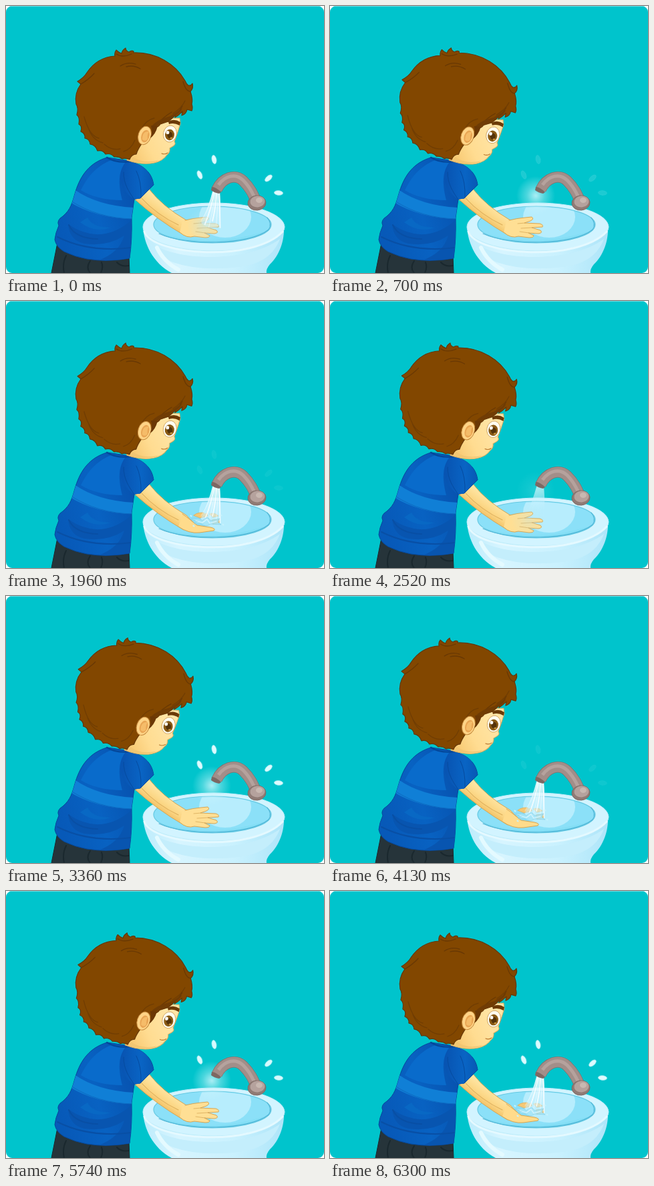
Animation, 476 px wide and 400 px high, one loop 6.37 s. Source, as an HTML page with a canvas:

```html
<!DOCTYPE html>
<html lang="en">
<head>
<meta charset="utf-8">
<title>Washing hands</title>
<style>
html, body { margin: 0; width: 100%; height: 100%; overflow: hidden; background: #fff; }
canvas { display: block; width: 476px; height: 400px; }
</style>
</head>
<body>
<canvas id="stage" width="476" height="400"></canvas>
<script>
const ctx = document.getElementById('stage').getContext('2d');
const LOOP = 6370, STEP = 70, CYCLE = LOOP / 3;

function shape(d, fill, stroke, width = 1) {
  const path = new Path2D(d);
  if (fill) { ctx.fillStyle = fill; ctx.fill(path); }
  if (stroke) { ctx.strokeStyle = stroke; ctx.lineWidth = width; ctx.stroke(path); }
}

function oval(x, y, rx, ry, turn, fill, stroke, width = 1) {
  ctx.beginPath();
  ctx.ellipse(x, y, rx, ry, turn, 0, Math.PI * 2);
  if (fill) { ctx.fillStyle = fill; ctx.fill(); }
  if (stroke) { ctx.strokeStyle = stroke; ctx.lineWidth = width; ctx.stroke(); }
}

function blend(x0, y0, x1, y1, ...stops) {
  const g = ctx.createLinearGradient(x0, y0, x1, y1);
  stops.forEach(([at, color]) => g.addColorStop(at, color));
  return g;
}

function glow(x, y, radius, rgb, alpha) {
  const g = ctx.createRadialGradient(x, y, 1, x, y, radius);
  g.addColorStop(0, `rgba(${rgb},${alpha})`);
  g.addColorStop(.45, `rgba(${rgb},${alpha * .45})`);
  g.addColorStop(1, `rgba(${rgb},0)`);
  ctx.fillStyle = g;
  ctx.fillRect(x - radius, y - radius, radius * 2, radius * 2);
}

function layer(alpha, draw) {
  if (alpha <= 0) return;
  ctx.save();
  ctx.globalAlpha = alpha;
  draw();
  ctx.restore();
}

// Linear interpolation through [time, value] pairs.
function track(u, keys) {
  const i = Math.max(1, keys.findIndex(k => k[0] >= u));
  const [a, va] = keys[i - 1], [b, vb] = keys[i];
  return va + (vb - va) * (u - a) / (b - a);
}

const WATER = [[0, 1], [.1, 1], [.3, 0], [.75, 0], [.88, 1], [1, 1]];
const DROPS = [[0, 1], [.06, 1], [.16, 0], [.3, 0], [.41, .5], [.5, 1],
  [.7, 1], [.82, 0], [.945, .06], [.96, 1], [1, 1]];

function background() {
  ctx.fillStyle = '#fff';
  ctx.fillRect(0, 0, 476, 400);
  ctx.beginPath();
  ctx.roundRect(0, 0, 476, 400, 9);
  ctx.fillStyle = '#00c4cc';
  ctx.fill();
  ctx.fillStyle = 'rgba(255,255,255,.4)';
  ctx.fillRect(8, 0, 460, 1);
}

function sink() {
  shape('M205 330C206 356 220 385 248 400H390Q389 394 395 387C409 374 417 352 416 331Z',
    blend(205, 0, 416, 0, [0, '#bdecfc'], [.25, '#d7f5ff'], [.65, '#c9f1fe'], [1, '#aee5f9']));
  shape('M214 352C248 383 360 386 410 349C401 372 384 386 350 391Q290 398 250 384Q226 374 214 352Z', '#c4eefc');
  shape('M226 362Q236 383 258 395', null, '#e4faff', 6);
  oval(311, 331, 106, 36, 0, '#d2f4ff', '#bcecfa');
  shape('M207 338C220 374 371 384 414 338', null, '#e4f9ff', 3);
  oval(309, 327.5, 88, 27.5, 0, '#8be0f8', '#65c9e2', 1.2);
  ctx.save();
  ctx.beginPath();
  ctx.ellipse(309, 327.5, 87, 26.5, 0, 0, 7);
  ctx.clip();
  oval(328, 316, 39, 31, 0, '#b7edfd');
  shape('M227 339Q306 364 390 337L375 358H240Z', '#83def5');
  ctx.restore();
  shape('M229 341C268 359 364 359 393 335Q399 327 391 317', null, '#4fb5d6', 1.1);
}

function tap() {
  ctx.lineCap = 'butt';
  const pipe = 'M315.5 275C324 257 343 250.5 355 262C366 273 370 282 374 292';
  shape(pipe, null, '#86706b', 16.5);
  shape(pipe, null, '#a28e89', 15);
  shape('M318 268C328 254 344 250 355 261C365 271 369 280 372 287', null, '#b5a29d', 5);
  shape('M308 271Q314 271 322 279L319 281Q312 280 307 276Z', '#7d6863');
  oval(375.5, 295, 13.5, 11, -.1, '#907b75', '#806a65');
  oval(376.5, 293, 11, 8.5, -.1, '#b5a29d');
  oval(379, 291, 5, 4, 0, '#c8b8b1');
}

function body() {
  shape('M78 350L68 400H185L184 374Z', '#26343a', '#1b2a30');
  shape('M90 374Q84 386 87 400M143 384Q146 391 142 400M126 382Q119 392 126 400M166 384Q172 391 184 389', null, '#1a282e', 2);
  const shirt = 'M151 227C125 235 112 253 104 278C99 295 97 305 85 315Q75 321 79 329Q74 340 73 350' +
    'Q75 361 87 368Q104 376 121 379Q152 384 185 378Q189 349 188 317L192 289L201 288L221 268C218 245 199 235 178 231Z';
  shape(shirt, blend(80, 330, 195, 300, [0, '#0759b8'], [.5, '#0862c2'], [1, '#0753b0']), '#06489a', 1);
  ctx.save();
  ctx.clip(new Path2D(shirt));
  shape('M157 231C132 242 122 257 112 276Q137 291 174 291C167 263 169 245 180 233Z', '#096bcb');
  shape('M104 276Q137 299 191 302L190 319Q135 318 94 293Z', '#107fd6');
  shape('M97 292Q137 318 190 319', null, '#0c69c0', 1);
  shape('M93 327Q142 360 188 321V383H133Q170 371 177 344Q151 361 117 356Q95 351 93 327Z', '#0855b0');
  shape('M77 346Q125 370 187 362M94 328Q103 348 137 349', null, '#084fa5', 2);
  shape('M122 317Q130 332 156 332Q133 341 111 324Z', '#0868c4');
  ctx.restore();
  shape('M181 233C164 252 171 276 192 290L201 288L221 268C216 245 201 235 181 233Z',
    blend(174, 0, 221, 0, [0, '#0854b2'], [.6, '#0964c4'], [1, '#0758b4']));
  shape('M176 249C176 267 184 278 192 290M201 288L221 268M195 247Q203 263 202 287', null, '#064b9f', 1);
  shape('M151 227Q165 236 188 233', null, '#04479a', 2.2);
}

function arm(splashing) {
  const edge = '#d6a552';
  shape('M192 289L214 274Q234 300 270 321L281 333L266 343Q226 320 192 289Z',
    blend(228, 322, 244, 300, [0, '#f0bd60'], [.45, '#fbd684'], [1, '#ffe5a3']), edge);
  shape('M203 288Q226 313 258 328', null, '#dcad5b', 1.1);
  if (splashing) {
    shape('M264 320Q278 330 286 336L306 339Q315 341 311 344L290 347Q274 349 258 338Z', '#ffdb8b');
    shape('M264 319Q278 329 286 336L306 339Q315 341 311 344L290 347Q274 349 258 338', null, edge);
    shape('M281 321Q288 315 301 318L302 322L291 325ZM305 319Q312 316 318 322L310 324ZM309 328L319 327L320 332L310 334Z',
      '#f5c874', '#e0ae5a', .8);
  } else {
    shape('M264 323Q280 318 292 317L302 316Q306 319 300 322L291 325L314 326Q320 328 318 331' +
      'L302 332L315 336Q319 340 312 341L297 340L305 344Q305 347 298 347L282 345Q271 349 260 339Z', '#ffdf94');
    shape('M268 321Q280 318 292 317L302 316Q306 319 300 322L291 325L314 326Q320 328 318 331' +
      'L302 332L315 336Q319 340 312 341L297 340L305 344Q305 347 298 347L282 345Q271 349 260 339', null, edge);
    shape('M281 326L292 325M286 333L302 332M284 338L298 340', null, '#dcb060', .9);
  }
}

function mist(alpha) {
  layer(alpha, () => glow(308, 284, 29, '205,246,252', .8));
}

// A soft beam that sharpens into separate jets as the level rises.
function stream(level) {
  const end = 286 + 48 * level;
  layer(Math.min(1, level * 1.4), () => {
    ctx.beginPath();
    ctx.rect(275, 270, 65, end - 270);
    ctx.clip();
    const foot = level > .95 ? .4 : 0;
    shape('M310 275Q302 304 292 325Q306 338 321 329Q322 299 320 278Z',
      blend(0, 274, 0, end, [0, 'rgba(240,253,255,.9)'], [.6, 'rgba(205,243,255,.68)'], [1, `rgba(197,241,255,${foot})`]));
  });
  layer(level * 2 - 1.1, () => {
    for (let i = 0; i < 6; i++) {
      shape(`M${310 + i * 1.8} 277Q${305 + i * 3} 302 ${292 + i * 5.7} ${322 + i % 3 * 5}`, null,
        `rgba(255,255,255,${.55 + .3 * (i % 2)})`, i % 2 ? 1.8 : 1);
    }
  });
}

function splash() {
  shape('M276 327Q288 323 294 329Q302 320 306 329L320 326Q314 331 322 335L306 334Q299 340 292 334L281 333L287 330Z',
    'rgba(165,229,248,.8)', 'rgba(120,195,220,.6)', .8);
  shape('M284 329L294 332L301 327L305 333L315 330', null, 'rgba(234,250,255,.8)', 1.2);
  [[277, 322], [298, 317], [322, 321], [325, 335], [281, 337]].forEach(([x, y]) =>
    oval(x, y, 1.7, 1.2, .5, '#c7f2fc'));
}

function drops(alpha) {
  layer(alpha, () => {
    [[290, 253, -.4], [311.5, 230, -.2], [393, 258, .85], [408, 280, 1.65]].forEach(([x, y, turn]) =>
      oval(x, y, 3.4, 6.6, turn, '#dcfbff', '#9ce9ee', .8));
  });
}

function head(lean) {
  ctx.save();
  ctx.translate(185, 140);
  ctx.rotate(.045 * lean);
  ctx.translate(-185, -140);

  shape('M190 168H260L261 176Q257 190 252 203Q255 207 250 210L245 213Q246 219 241 223' +
    'Q235 232 222 235Q204 239 181 231Z', blend(188, 222, 250, 190, [0, '#f8ca74'], [.4, '#ffdc91'], [1, '#ffe5a6']), '#dbb062');
  shape('M190 226Q205 237 229 231Q218 238 185 232Z', '#f2c672');
  shape('M233 221Q238 223 242 220', null, '#b9782f', 1.1);

  oval(245.5, 191.5, 10, 12.5, .2, '#fffdf0', '#cfa05a', .9);
  oval(245, 193, 7, 8.3, .1, '#8a5a14');
  oval(245.5, 193.5, 4, 4.8, 0, '#54330a');
  oval(242, 189.5, 2.4, 2.6, 0, '#fff');
  oval(247.5, 198, 2, 1.4, 0, '#c6923f');
  shape('M243 173Q252 168 261 174L260 179Q251 174 244 177Z', '#6b3a06');

  shape('M163 75Q162 70 165 66Q169 70 173 71Q174 66 179 63Q179 67 184 69Q188 66 191 68L191 70' +
    'C225 69 254 87 268 112Q270 117 273 119Q277 120 279 116Q281 123 276 128Q280 140 278 147' +
    'Q280 153 278 157L271 155Q270 162 263 164L264 158Q258 164 253 167L254 162Q249 169 243 173' +
    'L231 177Q228 182 222 182Q217 196 204 205Q197 215 195 222Q188 222 185 230Q178 227 174 229' +
    'Q169 225 162 226Q157 220 149 222Q145 215 137 217Q134 208 126 207Q125 199 118 198' +
    'Q119 191 112 188Q115 180 109 177Q111 167 106 163Q109 153 105 147Q102 131 112 117' +
    'L107 113Q117 107 121 100Q136 77 163 75Z', '#824700', '#653604', 1.2);

  shape('M112 117Q124 110 132 101M165 72Q174 78 188 72M171 90Q181 83 194 87M180 91Q191 88 201 94' +
    'M265 113Q269 128 276 128M242 173Q256 164 264 150M222 181Q237 165 248 159M229 177Q239 174 247 166',
    null, '#683804', 1.3);
  shape('M124 185Q130 201 145 205M117 166Q125 195 139 198M147 207Q158 217 171 214M176 218Q187 215 193 201' +
    'M203 184Q209 171 222 168M250 161Q263 153 268 142', null, '#703d03', 1.3);
  shape('M217 181Q226 170 246 165L264 153Q260 162 253 164L243 172L231 177L222 182Z', '#703c04');

  oval(207.5, 194, 9.5, 14, .3, '#ffd487', '#c4883b');
  oval(208.5, 195, 6, 9.5, .3, '#e9a654');
  shape('M204 200Q204 187 214 188Q211 193 212 199Q209 204 204 200Z', '#f5bc69');
  shape('M217 179Q220 188 216 198Q224 192 227 180Z', '#6b3805');
  ctx.restore();
}

function draw(now) {
  const time = Math.floor(now % LOOP / STEP) * STEP;
  const u = time % CYCLE / CYCLE;
  const water = track(u, WATER);
  const splashing = u > .86 && u < .985;
  ctx.lineJoin = 'round';
  ctx.lineCap = 'round';
  background();
  sink();
  arm(splashing);
  mist((1 - water) ** 2);
  if (!splashing) layer(water, () => glow(297, 328, 26, '190,232,238', .6));
  stream(water);
  if (splashing) splash();
  tap();
  ctx.lineCap = 'round';
  body();
  head((1 - Math.cos((u - .01) * Math.PI * 2)) / 2);
  drops(track(u, DROPS));
}

function tick(now) {
  draw(now);
  requestAnimationFrame(tick);
}
draw(0);
requestAnimationFrame(tick);
</script>
</body>
</html>
```
